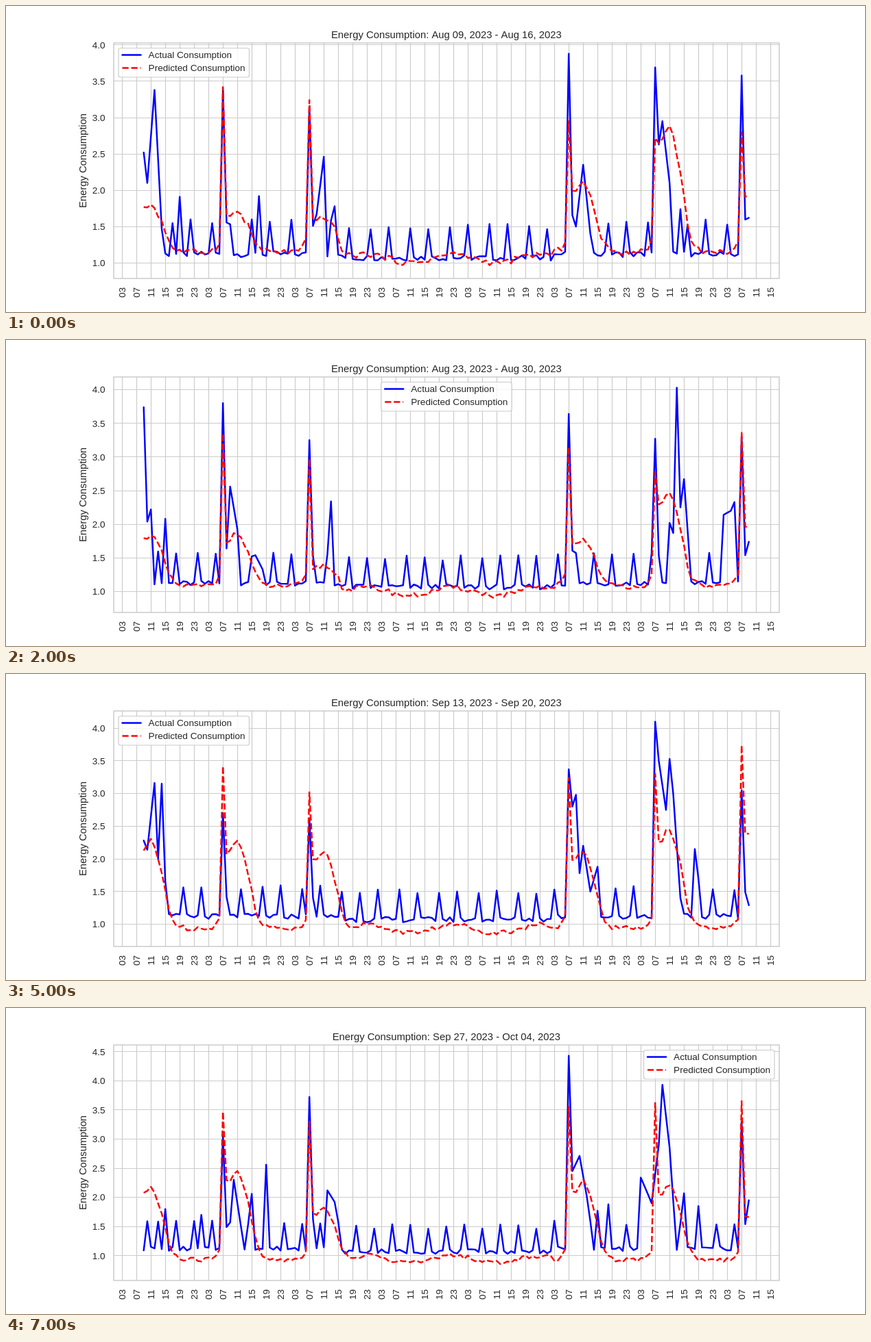
An HTML page with a canvas that plays this animation: 1252 px wide and 447 px high, repeating every 8000 ms.

```html
<!DOCTYPE html>
<html lang="en">
<head>
<meta charset="utf-8">
<title>Energy Consumption</title>
<style>
html, body { margin: 0; width: 100%; height: 100%; overflow: hidden; background: #fff; }
canvas { display: block; width: 1252px; height: 447px; }
</style>
</head>
<body>
<canvas id="chart"></canvas>
<script>
const WIDTH = 1252, HEIGHT = 447, WEEK_MS = 1000, HOURS = 168;
const BOX = { left: 157, right: 1127, top: 54, bottom: 398 };
const FIRST_X = 200.7, HOUR_PX = 5.25;
const FONT = '"Liberation Sans", Arial, sans-serif';
const INK = '#262626', LINE = '#ccc', BLUE = '#00f', RED = '#f00';
const LEGEND_X = { left: 164, center: 546.7, right: 929.5 };

// Hour 0 is Wednesday 09:00; the office opens at 07:00 on workdays.
const OPENINGS = [-2, 22, 46, 118, 142, 166];
const isWeekend = h => h > 54 && h < 114;

// opening, forecast: 07:00 peaks; noon: forecast level at midday; night, weekend: forecast at rest;
// first, every: rhythm of the short spikes; bursts: [hour, value] of other notable use.
const weeks = [];
const addWeek = week => weeks.push({ legend: 'left', ...week });

addWeek({
  low: .933, night: 1.15, weekend: 1.06, first: 2, every: 5.5,
  opening: [3.38, 3.15, 3.88, 3.69, 3.58],
  forecast: [3.42, 3.24, 2.95, 2.72, 2.8],
  noon: [1.82, 1.72, 1.65, 2.12, 2.92, 2],
  bursts: [[0, 2.52], [1, 2.1], [3, 3.38], [5, 1.47], [10, 1.91], [32, 1.92], [48, 1.67], [50, 2.46], [53, 1.78],
    [120, 1.5], [122, 2.35], [124, 1.4], [143, 2.63], [144, 2.95], [146, 2.1], [149, 1.74], [168, 1.62]]
});
addWeek({
  low: .88, night: 1.1, weekend: 1.02, first: 4, every: 5.4,
  opening: [3.45, 3.2, 3.8, 3.6, 3.4],
  forecast: [3.3, 3.1, 3, 2.75, 3.1],
  noon: [1.95, 1.8, 1.55, 2, 2.5, 1.85],
  bursts: [[0, 1.62], [2, 1.9], [25, 1.8], [32, 1.85], [50, 1.95], [122, 2.3], [124, 1.4], [146, 2.2], [168, 3.74]]
});
addWeek({
  legend: 'center', low: .848, night: 1.08, weekend: 1, first: 3.5, every: 5.27,
  opening: [3.8, 3.25, 3.64, 3.27, 3.3],
  forecast: [3.35, 2.97, 3.15, 2.78, 3.36],
  noon: [1.87, 1.88, 1.4, 1.8, 2.48, 2.1],
  bursts: [[0, 3.74], [1, 2.04], [2, 2.22], [6, 2.08], [24, 2.56], [26, 1.93], [31, 1.54], [33, 1.33], [52, 2.34],
    [146, 2.02], [147, 1.87], [148, 4.03], [149, 2.25], [150, 2.67], [152, 1.15], [161, 2.14], [163, 2.2], [164, 2.33], [168, 1.74]]
});
addWeek({
  low: .881, night: 1.1, weekend: .98, first: 4.5, every: 5.4,
  opening: [3.43, 3.2, 3.58, 1.99, 2.06],
  forecast: [2.92, 3.05, 2.92, 2.82, 2.4],
  noon: [2.05, 1.88, 1.55, 2.45, 3.87, 2.15],
  bursts: [[0, 1.74], [1, 1.81], [3, 1.65], [25, 1.86], [27, 1.35], [35, 1.77], [38, 1.75], [44, 1.44], [50, 1.75],
    [120, 2.41], [121, 1.62], [122, 2.7], [124, 1.38], [129, 1.6], [143, 1.73], [147, 1.77], [153, 1.75], [168, 1.29]]
});
addWeek({
  low: .85, night: 1.02, weekend: .96, first: 5, every: 5.4,
  opening: [3.2, 3.1, 3.5, 3.8, 3.2],
  forecast: [3.2, 3, 3.1, 3.1, 3.3],
  noon: [2, 2.05, 1.75, 2.15, 2.7, 2.3],
  bursts: [[0, 1.29], [25, 1.75], [50, 1.9], [122, 2.2], [124, 1.5], [144, 2.7], [146, 2.3], [168, 2.28]]
});
addWeek({
  low: .823, night: .94, weekend: .93, first: 5, every: 5.45,
  opening: [2.7, 2.62, 3.37, 4.1, 3.05],
  forecast: [3.42, 3.02, 3.24, 3.3, 3.74],
  noon: [2.3, 2.3, 2.15, 2.15, 2.5, 2.6],
  bursts: [[0, 2.28], [1, 2.14], [3, 3.16], [4, 2], [5, 3.15], [6, 1.65], [119, 2.8], [120, 2.98], [121, 1.78], [122, 2.2],
    [124, 1.5], [126, 1.88], [143, 3.5], [145, 2.75], [146, 3.53], [147, 3], [149, 1.4], [153, 2.15], [154, 1.7], [168, 1.29]]
});
addWeek({
  legend: 'right', low: .817, night: .96, weekend: .96, first: 1, every: 5.4, weekendEvery: 1.5,
  opening: [3.85, 3.85, 3.77, 3.32, 3.46],
  forecast: [3.48, 3.5, 3.48, 3.42, 3.47],
  noon: [2.4, 2.4, 1.62, 2.25, 2.6, 2.3],
  bursts: [[1, 1.63], [8, 1.88], [33, 1.93], [37, 2.69], [38, 2], [39, 2.38], [40, 2.09], [42, 3.31], [43, 2.67], [45, 2.5],
    [66, 3.05], [68, 2.55], [69, 2.81], [119, 2.95], [121, 3.15], [122, 1.63], [124, 2.48], [126, 2.05], [130, 2.03],
    [143, 3.46], [145, 1.57], [146, 3.05], [148, 1.54], [149, 2.16], [153, 1.78]]
});
addWeek({
  legend: 'right', low: .758, night: .93, weekend: .94, first: 4, every: 5,
  opening: [3.05, 3.72, 4.43, 3.35, 3.3],
  forecast: [3.47, 3.3, 3.55, 3.62, 3.65],
  noon: [2.2, 2.5, 1.85, 2.3, 2.25, 1.8],
  bursts: [[1, 1.59], [6, 1.8], [16, 1.7], [25, 2.3], [27, 1.5], [30, 2.06], [34, 2.56], [51, 2.12], [53, 1.92], [119, 2.45],
    [121, 2.71], [123, 2.02], [126, 1.77], [129, 1.88], [138, 2.34], [140, 2.05], [141, 1.9],
    [143, 2.9], [144, 3.93], [146, 2.85], [147, 1.95], [150, 2.07], [154, 1.85], [168, 1.95]]
});

const noise = (n, seed) => {
  const s = Math.sin(n * 12.9898 + seed * 78.233) * 43758.5453;
  return s - Math.floor(s);
};

// Low use with a short spike whenever another cycle is complete.
function restingUse(week, h, seed) {
  const weekend = isWeekend(h);
  const every = weekend && week.weekendEvery || week.every;
  const cycles = hour => Math.floor((hour - week.first) / every);
  const level = cycles(h) > cycles(h - 1) ? (weekend ? 1.46 : 1.52) : (weekend ? 1.03 : 1.08);
  return level + .08 * noise(h, seed);
}

function actualSeries(week, seed) {
  const values = Array.from({ length: HOURS + 1 }, (_, h) => restingUse(week, h, seed));
  week.opening.forEach((peak, i) => {
    const h = OPENINGS[i + 1];
    values[h] = peak;
    values[h + 1] = 1.1 + .2 * (peak - 1.1);
  });
  week.bursts.forEach(([h, value], i) => {
    values[h] = value;
    const [next, nextValue] = week.bursts[i + 1] || [];
    if (next === h + 2) values[h + 1] = (value + nextValue) / 2;
  });
  return values;
}

// Share of the midday level t hours after opening: a plateau with a hump, fading in the afternoon.
const officeShape = t => (.85 + .15 * Math.exp(-(((t - 4) / 1.5) ** 2))) / (1 + Math.exp(t - 8));

function predictedAt(week, h, seed) {
  const day = OPENINGS.findLastIndex(opening => opening <= h);
  const t = h - OPENINGS[day];
  if (t === 0) return week.forecast[day - 1];
  const untilOpening = (OPENINGS[day + 1] ?? Infinity) - h;
  const rest = isWeekend(h)
    ? week.weekend + .06 * Math.cos((h - 86) / 12 * Math.PI)
    : week.night + .15 * Math.exp(1 - untilOpening);
  return rest + (week.noon[day] - rest) * officeShape(t) + .08 * (noise(h, seed + 9) - .5);
}

const predictedSeries = (week, seed) =>
  Array.from({ length: HOURS + 1 }, (_, h) => predictedAt(week, h, seed));

const canvas = document.getElementById('chart');
const ctx = canvas.getContext('2d');
const ratio = window.devicePixelRatio || 1;
canvas.width = WIDTH * ratio;
canvas.height = HEIGHT * ratio;
ctx.scale(ratio, ratio);
ctx.lineJoin = 'round';

function text(label, x, y, size, align, turned) {
  ctx.save();
  ctx.translate(x, y);
  if (turned) ctx.rotate(-Math.PI / 2);
  ctx.font = `${size}px ${FONT}`;
  ctx.textAlign = align;
  ctx.fillStyle = INK;
  ctx.fillText(label, 0, size * .36);
  ctx.restore();
}

function polyline(points, color, width, dashed) {
  ctx.beginPath();
  points.forEach(([x, y]) => ctx.lineTo(x, y));
  ctx.strokeStyle = color;
  ctx.lineWidth = width;
  ctx.lineCap = dashed ? 'butt' : 'round';
  ctx.setLineDash(dashed ? [9.1, 3.95] : []);
  ctx.stroke();
  ctx.setLineDash([]);
}

const snap = v => Math.floor(v) + .5;

function dateLabel(week) {
  const date = new Date(Date.UTC(2023, 7, 9 + 7 * week));
  const month = ['Aug', 'Sep', 'Oct'][date.getUTCMonth() - 7];
  return `${month} ${String(date.getUTCDate()).padStart(2, '0')}, 2023`;
}

function drawLegend(x) {
  ctx.beginPath();
  ctx.roundRect(x, 61.5, 190.5, 42.5, 3);
  ctx.fillStyle = 'rgba(255, 255, 255, .8)';
  ctx.fill();
  ctx.strokeStyle = LINE;
  ctx.lineWidth = 1.2;
  ctx.stroke();
  [['Actual Consumption', BLUE], ['Predicted Consumption', RED]].forEach(([label, color], i) => {
    const y = 71.5 + 19 * i;
    polyline([[x + 5.5, y], [x + 32.5, y]], color, 2.47, i === 1);
    text(label, x + 43.6, y, 13.57, 'left');
  });
}

function drawWeek(index) {
  const week = weeks[index];
  const actual = actualSeries(week, index), predicted = predictedSeries(week, index);
  const max = Math.max(...actual, ...predicted);
  const margin = (max - week.low) * .05, low = week.low - margin, high = max + margin;
  const toX = h => FIRST_X + h * HOUR_PX;
  const toY = v => BOX.bottom - (v - low) / (high - low) * (BOX.bottom - BOX.top);
  const plot = values => values.map((v, h) => [toX(h), toY(v)]);

  ctx.fillStyle = '#fff';
  ctx.fillRect(0, 0, WIDTH, HEIGHT);

  for (let h = -6; h <= 174; h += 4) {
    const x = snap(toX(h));
    polyline([[x, BOX.top], [x, BOX.bottom]], LINE, 1.2);
    text(String((h + 33) % 24).padStart(2, '0'), toX(h), 418.5, 13.57, 'center', true);
  }
  for (let v = Math.ceil(low * 2) / 2; v <= high; v += .5) {
    const y = snap(toY(v));
    polyline([[BOX.left, y], [BOX.right, y]], LINE, 1.2);
    text(v.toFixed(1), 144.5, toY(v), 13.57, 'right');
  }

  polyline(plot(actual), BLUE, 2.47);
  polyline(plot(predicted), RED, 2.47, true);

  ctx.strokeStyle = LINE;
  ctx.lineWidth = 1.54;
  ctx.strokeRect(BOX.left, BOX.top, BOX.right - BOX.left, BOX.bottom - BOX.top);

  text(`Energy Consumption: ${dateLabel(index)} - ${dateLabel(index + 1)}`, 641.8, 41.3, 14.8, 'center');
  text('Energy Consumption', 112, 226, 14.8, 'center', true);
  drawLegend(LEGEND_X[week.legend]);
}

const startTime = performance.now();
let shown = -1;
function tick() {
  const index = Math.floor((performance.now() - startTime) / WEEK_MS) % weeks.length;
  if (index !== shown) drawWeek(shown = index);
  requestAnimationFrame(tick);
}
tick();
</script>
</body>
</html>
```
